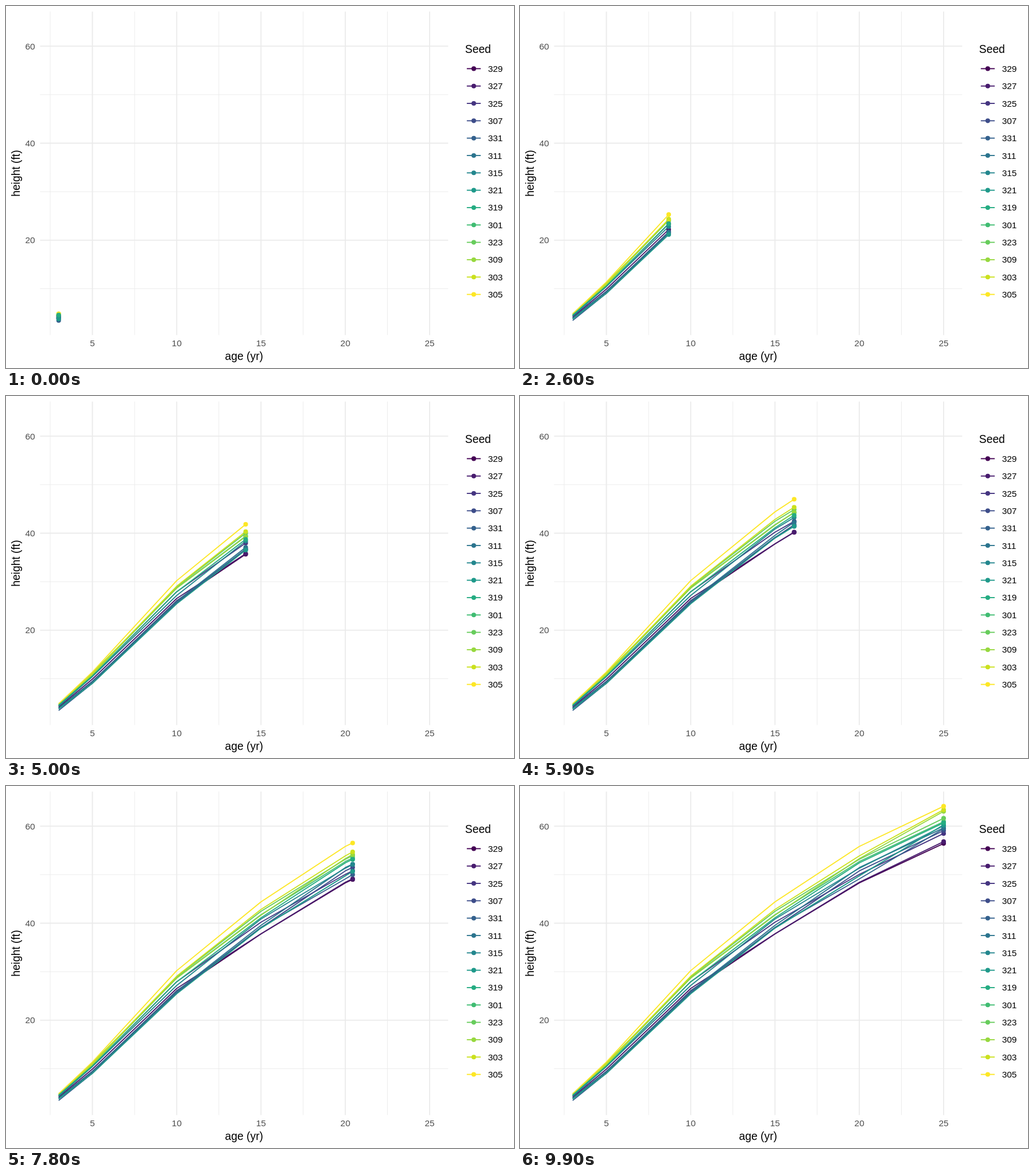
These frames come from a looping animation (885 by 632 pixels, 10 s). An HTML page with a canvas:

```html
<!DOCTYPE html>
<html lang="en">
<head>
<meta charset="utf-8">
<title>Tree height by age</title>
<style>
  html, body { margin: 0; width: 100%; height: 100%; overflow: hidden; background: #fff; }
  canvas { display: block; }
</style>
</head>
<body>
<canvas id="chart" width="885" height="632"></canvas>
<script>
const ctx = document.getElementById('chart').getContext('2d');
const FONT = '"Liberation Sans", Arial, sans-serif';
const LINE = 1.87, RADIUS = 4.04;
const LEFT = 59.4, RIGHT = 770.3, TOP = 9.65, BOTTOM = 574.5;

const ages = [3, 5, 10, 15, 20, 25];
const keySteps = [0, 9, 32, 54, 76, 99];   // step at which each age is reached
const series = [
  [329, '#440154', 3.93, 9.34, 26.08, 37.79, 48.31, 56.43],
  [327, '#481c6e', 4.12, 9.92, 26.54, 37.82, 48.43, 56.81],
  [325, '#453581', 4.38, 10.48, 27.93, 40.20, 50.06, 58.49],
  [307, '#3d4d8a', 3.91, 9.48, 25.66, 39.07, 50.78, 59.07],
  [331, '#34618d', 3.46, 9.05, 25.85, 39.15, 49.12, 59.49],
  [311, '#2b748e', 3.88, 9.40, 25.99, 39.55, 51.46, 59.64],
  [315, '#24878e', 4.32, 10.43, 27.16, 40.85, 51.33, 60.07],
  [321, '#1f998a', 3.77, 9.03, 25.45, 38.98, 49.76, 60.28],
  [319, '#25ac82', 4.57, 10.57, 27.90, 41.13, 52.43, 60.69],
  [301, '#40bc72', 4.51, 10.89, 28.72, 41.74, 52.70, 60.92],
  [323, '#67cc5c', 4.33, 10.79, 28.97, 42.44, 53.17, 61.62],
  [309, '#97d83f', 4.81, 11.20, 28.66, 41.66, 53.31, 63.05],
  [303, '#cbe11e', 4.55, 10.92, 29.07, 42.83, 53.88, 63.39],
  [305, '#fde725', 4.79, 11.37, 30.21, 44.40, 55.82, 64.10]
].map(([seed, color, ...heights]) => ({ seed, color, heights }));
// Stacking: the first series, then the last five, then the rest
const stacked = [series[0], ...series.slice(9), ...series.slice(1, 9)];

const px = age => 150.5 + (age - 5) * 29.375;
const py = height => 408.85 - (height - 20) * 8.468;
const mix = (a, b, k) => a + (b - a) * k;

function stroke(points, color, width) {
  ctx.beginPath();
  points.forEach(([x, y]) => ctx.lineTo(x, y));
  ctx.strokeStyle = color;
  ctx.lineWidth = width;
  ctx.stroke();
}

function dot([x, y], color) {
  ctx.beginPath();
  ctx.arc(x, y, RADIUS, 0, 2 * Math.PI);
  ctx.fillStyle = color;
  ctx.fill();
}

function label(text, x, y, size, color = '#000', align = 'left') {
  ctx.font = `${size}px ${FONT}`;
  ctx.fillStyle = color;
  ctx.textAlign = align;
  ctx.fillText(text, x, y);
}

function drawGrid() {
  const column = (age, w) => stroke([[px(age), TOP], [px(age), BOTTOM]], '#ebebeb', w);
  const row = (height, w) => stroke([[LEFT, py(height)], [RIGHT, py(height)]], '#ebebeb', w);
  [10, 30, 50].forEach(h => row(h, LINE / 2));
  [2.5, 7.5, 12.5, 17.5, 22.5].forEach(a => column(a, LINE / 2));
  [20, 40, 60].forEach(h => {
    row(h, LINE);
    label(h, 50.7, py(h) + 5.5, 15.43, '#4d4d4d', 'right');
  });
  ages.slice(1).forEach(a => {
    column(a, LINE);
    label(a, px(a), 594.3, 15.43, '#4d4d4d', 'center');
  });
  label('age (yr)', 414.8, 618.1, 19.3, '#000', 'center');
  ctx.save();
  ctx.translate(23.7, 292.1);
  ctx.rotate(-Math.PI / 2);
  label('height (ft)', 0, 0, 19.3, '#000', 'center');
  ctx.restore();
}

function drawLegend() {
  label('Seed', 799.8, 82, 19.3);
  series.forEach(({ seed, color }, i) => {
    const y = 109.4 + i * 30.32;
    stroke([[802.8, y], [827, y]], color, LINE);
    dot([814.9, y], color);
    label(seed, 839.7, y + 5.5, 15.43);
  });
}

function drawSeries(step) {
  const i = Math.max(1, keySteps.findIndex(s => s >= step));
  const k = (step - keySteps[i - 1]) / (keySteps[i] - keySteps[i - 1]);
  const tip = heights => [px(mix(ages[i - 1], ages[i], k)), py(mix(heights[i - 1], heights[i], k))];
  if (step) {
    stacked.forEach(({ color, heights }) => {
      const past = heights.slice(0, i).map((h, j) => [px(ages[j]), py(h)]);
      stroke([...past, tip(heights)], color, LINE);
    });
  }
  stacked.forEach(({ color, heights }) => dot(tip(heights), color));
}

const start = performance.now();
function frame() {
  const step = Math.floor((performance.now() - start) / 100) % 100;
  ctx.fillStyle = '#fff';
  ctx.fillRect(0, 0, 885, 632);
  ctx.lineJoin = 'round';
  drawGrid();
  drawSeries(step);
  drawLegend();
  requestAnimationFrame(frame);
}
frame();
</script>
</body>
</html>
```
